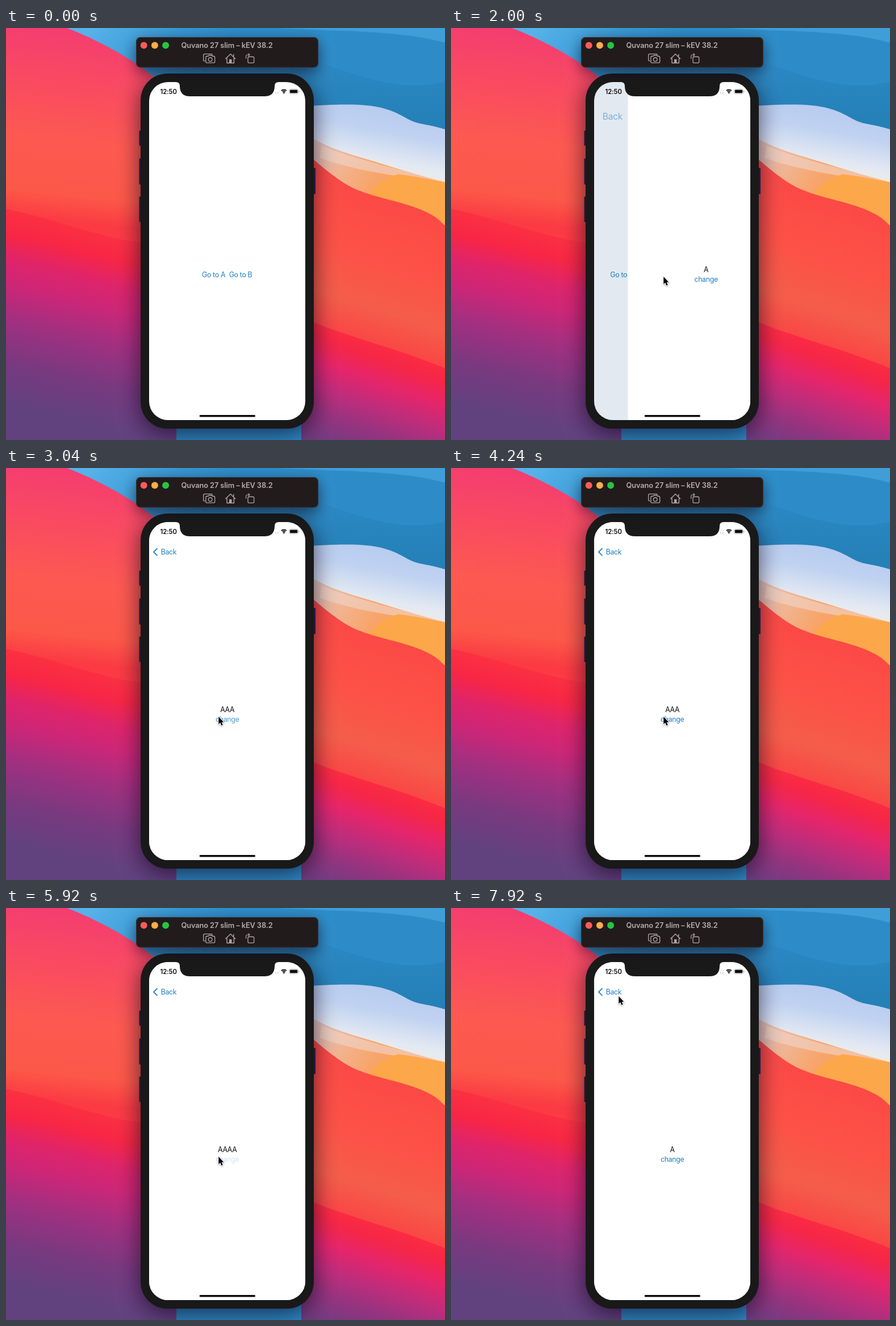
Recreate the animation shown at these times as an HTML page with a canvas. Size 773 by 724 pixels, loop 8000 ms.

```html
<!DOCTYPE html>
<html lang="en">
<head>
<meta charset="utf-8">
<title>Simulator navigation</title>
<style>
  html, body { margin: 0; width: 100%; height: 100%; overflow: hidden; background: #2582bb; }
  canvas { display: block; }
</style>
</head>
<body>
<canvas id="stage" width="773" height="724"></canvas>
<script>
const W = 773, H = 724, LOOP = 8000, STEP = 80;
const BLUE = '#1f7fc6', INK = '#0b0b0d', BODY = '#191919', ICON = '#b5a2a8';
const SCREEN = { x: 252, y: 95, w: 275, h: 594 };
const stage = document.getElementById('stage').getContext('2d');
const back = document.createElement('canvas');
back.width = W;
back.height = H;

const clamp = v => Math.min(1, Math.max(0, v));
const mix = (a, b, p) => a + (b - a) * p;
const easeOut = u => 1 - (1 - clamp(u)) ** 3;
const smooth = u => { u = clamp(u); return u * u * (3 - 2 * u); };

function gradient(c, x0, y0, x1, y1, stops) {
  const g = c.createLinearGradient(x0, y0, x1, y1);
  stops.forEach(([at, color]) => g.addColorStop(at, color));
  return g;
}

function shape(c, d, fill) {
  c.fillStyle = fill;
  c.fill(new Path2D(d));
}

function line(c, d, color, width) {
  c.strokeStyle = color;
  c.lineWidth = width;
  c.stroke(new Path2D(d));
}

function box(c, x, y, w, h, r, fill) {
  c.beginPath();
  c.roundRect(x, y, w, h, r);
  c.fillStyle = fill;
  c.fill();
}

function disc(c, x, y, r, fill) {
  c.beginPath();
  c.arc(x, y, r, 0, Math.PI * 2);
  c.fillStyle = fill;
  c.fill();
}

function label(c, text, x, y, { size = 12.4, weight = 400, color = BLUE, align = 'left', gap = -0.35 } = {}) {
  c.font = `${weight} ${size}px Inter, "Liberation Sans", sans-serif`;
  c.letterSpacing = gap + 'px';
  c.textAlign = align;
  c.fillStyle = color;
  c.fillText(text, x, y);
}

function wallpaper(c) {
  // sky
  c.fillStyle = gradient(c, 150, 0, 300, 130, [[0, '#57b2e8'], [0.6, '#3797d3'], [1, '#2d8cc8']]);
  c.fillRect(0, 0, W, H);
  shape(c, 'M480 0 C580 6 700 4 773 26 V0 Z', '#3f9ed8');
  shape(c, 'M500 50 C570 62 610 84 660 94 S740 102 773 94 V200 H500 Z',
    gradient(c, 0, 60, 0, 170, [[0, '#2b88c3'], [1, '#2580b7']]));

  // pale ridge
  shape(c, 'M520 138 C580 134 630 132 664 141 S705 163 730 168 S760 174 773 178 V290 H520 Z',
    gradient(c, 660, 135, 640, 245, [[0, '#b6cbf0'], [0.4, '#c0d2f1'], [0.85, '#e3e9f2'], [1, '#ecebea']]));
  shape(c, 'M520 180 C560 212 610 222 660 238 S740 262 773 271 V370 H520 Z',
    gradient(c, 540, 205, 650, 265, [[0, '#dcc4c0'], [0.4, '#f0b799'], [1, '#f8a469']]));
  shape(c, 'M556 207 C600 226 690 248 773 270 C680 262 600 246 552 228 Z', 'rgba(240,214,202,0.6)');
  shape(c, 'M626 300 C650 282 662 264 690 257 C720 260 750 267 773 271 V370 Z', '#fca84a');

  // right hill
  shape(c, 'M520 214 C560 245 585 271 620 285 S700 306 730 319 S760 336 773 347 V724 H520 Z',
    gradient(c, 690, 300, 610, 550, [[0, '#fb4946'], [0.4, '#fd5146'], [0.75, '#f45d49'], [1, '#fa4444']]));
  shape(c, 'M520 508 C590 540 690 563 773 598 V724 H520 Z',
    gradient(c, 543, 518, 479, 700,
      [[0, '#fa2b42'], [0.12, '#f62647'], [0.32, '#e5256b'], [0.55, '#bd2d7c'], [0.78, '#92347f'], [1, '#713c80']]));

  // left hill
  shape(c, 'M0 0 H107 C155 18 215 50 250 78 C268 91 280 100 300 120 V420 H0 Z',
    gradient(c, 90, 0, 55, 335, [[0, '#f43d70'], [0.3, '#f94b60'], [0.58, '#fd5951'], [0.86, '#fc5848'], [1, '#fb3a43']]));
  shape(c, 'M0 318 C80 334 150 364 236 377 L300 390 V724 H0 Z',
    gradient(c, 0, 320, -77, 641,
      [[0, '#fb3042'], [0.12, '#f82645'], [0.25, '#df246a'], [0.38, '#cd2677'], [0.55, '#a42f80'], [0.78, '#79397f'], [1, '#61427f']]));
}

function withShadow(c, blur, dy, color, draw) {
  c.save();
  c.shadowBlur = blur;
  c.shadowOffsetY = dy;
  c.shadowColor = color;
  draw();
  c.restore();
}

function toolbar(c) {
  withShadow(c, 26, 8, 'rgba(10,5,20,0.6)', () => box(c, 229, 16, 321, 53.5, 8, '#211b1c'));
  c.beginPath();
  c.roundRect(229.5, 16.5, 320, 52.5, 8);
  c.strokeStyle = 'rgba(90,78,84,0.45)';
  c.lineWidth = 1;
  c.stroke();
  ['#fc5b57', '#fdad45', '#28c440'].forEach((color, i) => disc(c, 242.7 + i * 19.2, 30.4, 6, color));
  label(c, 'Quvano 27 slim – kEV 38.2', 389, 34.6,
    { size: 12.8, weight: 600, color: '#b9abb0', align: 'center', gap: -0.1 });

  c.lineJoin = c.lineCap = 'round';
  // camera
  line(c, 'M350 58 Q347.7 58 347.7 55.7 V48 Q347.7 45.7 350 45.7 H361 Q363.2 45.7 363.2 47.5', ICON, 1.3);
  line(c, 'M354 49.5 H356 L357.5 48 H362 L363.5 49.5 H365.5 Q367.7 49.5 367.7 51.7 V59 Q367.7 61.2 365.5 61.2 H354 Q351.8 61.2 351.8 59 V51.7 Q351.8 49.5 354 49.5 Z', ICON, 1.3);
  c.beginPath();
  c.arc(359.7, 55.3, 3.3, 0, Math.PI * 2);
  c.stroke();
  // house
  line(c, 'M386.7 54 L395.2 45.8 L403.7 54 M389 52.5 V61.5 H401.4 V52.5 M400.7 46.5 V50', ICON, 1.4);
  box(c, 393, 55, 4.4, 6.5, 0, ICON);
  // rotate
  line(c, 'M428 50.5 H434.7 Q436.7 50.5 436.7 52.5 V59.3 Q436.7 61.3 434.7 61.3 H428 Q426 61.3 426 59.3 V52.5 Q426 50.5 428 50.5 Z', ICON, 1.3);
  line(c, 'M422.6 53.5 V50 Q422.6 47 426 47 H429 M426.8 44.8 L429 47 L426.8 49.2', ICON, 1.2);
}

function phoneBody(c) {
  [[180, 27], [229, 46], [296, 45]].forEach(([y, h]) => box(c, 234.5, y, 5, h, 1.5, '#32203f'));
  box(c, 540, 246, 5, 46, 1.5, '#351d49');
  withShadow(c, 42, 10, 'rgba(14,4,30,0.68)', () => box(c, 237, 80, 305, 624, 47, BODY));
}

function buildBackdrop() {
  const c = back.getContext('2d');
  wallpaper(c);
  phoneBody(c);
  toolbar(c);
}

const PUSH = 1800, PUSH_TIME = 500;
const WORDS = [[0, 'A'], [2560, 'AA'], [2880, 'AAA'], [5840, 'AAAA'], [6560, 'A']];
const LINK_TAPS = [[1600, 1720]];
const CHANGE_TAPS = [[2480, 2560], [2760, 2860], [5760, 5940], [6480, 6570]];

// Buttons dim while held, then fade back.
function tapAlpha(t, taps) {
  const tap = taps.filter(([down]) => t >= down).pop();
  return tap ? mix(0.2, 1, clamp((t - tap[1]) / 240)) : 1;
}

function home(c, t, p) {
  const dx = -82.5 * p;
  c.globalAlpha = tapAlpha(t, LINK_TAPS);
  label(c, 'Go to A', 345 + dx, 437.5);
  c.globalAlpha = 1;
  label(c, 'Go to B', 392.7 + dx, 437.5);
  c.fillStyle = `rgba(20,70,130,${0.15 * p})`;
  c.fillRect(SCREEN.x, SCREEN.y, SCREEN.w, SCREEN.h);
}

function detail(c, t, p) {
  const left = SCREEN.x + SCREEN.w * (1 - p);
  const mid = left + SCREEN.w / 2;
  c.fillStyle = '#fff';
  c.fillRect(left, SCREEN.y, SCREEN.w, SCREEN.h);
  const word = WORDS.filter(([at]) => t >= at).pop()[1];
  label(c, word, mid + 0.2, 429, { color: INK, align: 'center' });
  c.globalAlpha = tapAlpha(t, CHANGE_TAPS);
  label(c, 'change', mid + 0.2, 445.6, { align: 'center' });
  c.globalAlpha = 1;
}

function navBar(c, p) {
  const q = 1 - p;
  c.globalAlpha = clamp((p - 0.55) / 0.45);
  label(c, 'Back', 272.7 - 27 * q, 151.8 + 44 * q, { size: 12.4 * (1 + 1.2 * q) });
  c.globalAlpha = clamp((p - 0.8) / 0.2);
  c.lineCap = c.lineJoin = 'round';
  line(c, 'M266 141.6 L260 147.6 L266 153.6', BLUE, 1.9);
  c.globalAlpha = 1;
}

function statusBar(c) {
  shape(c, 'M299 95 Q306 95 306 102 Q306 120 324 120 H455 Q473 120 473 102 Q473 95 480 95 V90 H299 Z', BODY);
  label(c, '12:50', 271.5, 115.6, { size: 11.3, weight: 600, color: INK, gap: -0.1 });
  for (let i = 0; i < 2; i++) disc(c, 474.8 + i * 4, 114.2, 0.9, '#b5b5c0');
  // wifi
  c.lineCap = 'butt';
  [5.8, 3.1].forEach(r => {
    c.beginPath();
    c.arc(489.3, 115, r + 0.8, -2.33, -0.81);
    c.strokeStyle = INK;
    c.lineWidth = 1.7;
    c.stroke();
  });
  shape(c, 'M489.3 115.6 L487.4 113.4 Q489.3 111.8 491.2 113.4 Z', INK);
  // battery
  c.beginPath();
  c.roundRect(498.7, 107.6, 15.7, 7.8, 2.4);
  c.strokeStyle = '#a8a8ac';
  c.lineWidth = 0.9;
  c.stroke();
  box(c, 499.9, 108.8, 13.3, 5.4, 1.3, INK);
  box(c, 515.3, 110.2, 1.2, 2.8, 0.6, '#a8a8ac');
  box(c, 340.6, 680, 98.4, 3.6, 1.8, INK);
}

function cursor(c, t) {
  if (t < 720) return;
  const enter = smooth((t - 720) / 560), leave = smooth((t - 6880) / 720);
  const x = mix(mix(425, 374, enter), 295, leave);
  const y = mix(mix(730, 437, enter), 155, leave);
  c.save();
  c.translate(x, y);
  c.lineJoin = 'round';
  const arrow = 'M0.3 0 V13.2 L3.2 10.5 L5.4 15.6 L7.8 14.6 L5.7 9.7 H9.5 Z';
  withShadow(c, 3, 1, 'rgba(0,0,0,0.35)', () => line(c, arrow, '#fff', 2));
  shape(c, arrow, '#05070c');
  c.restore();
}

function render(t) {
  const c = stage;
  const p = easeOut((t - PUSH) / PUSH_TIME);
  c.drawImage(back, 0, 0);
  c.save();
  c.beginPath();
  c.roundRect(SCREEN.x, SCREEN.y, SCREEN.w, SCREEN.h, 33);
  c.fillStyle = '#fff';
  c.fill();
  c.clip();
  if (p < 1) home(c, t, p);
  if (p > 0) {
    detail(c, t, p);
    navBar(c, p);
  }
  statusBar(c);
  c.restore();
  cursor(c, t);
}

const start = performance.now();
function tick() {
  const t = (performance.now() - start) % LOOP;
  render(Math.floor(t / STEP) * STEP);
  requestAnimationFrame(tick);
}

buildBackdrop();
tick();
</script>
</body>
</html>
```
